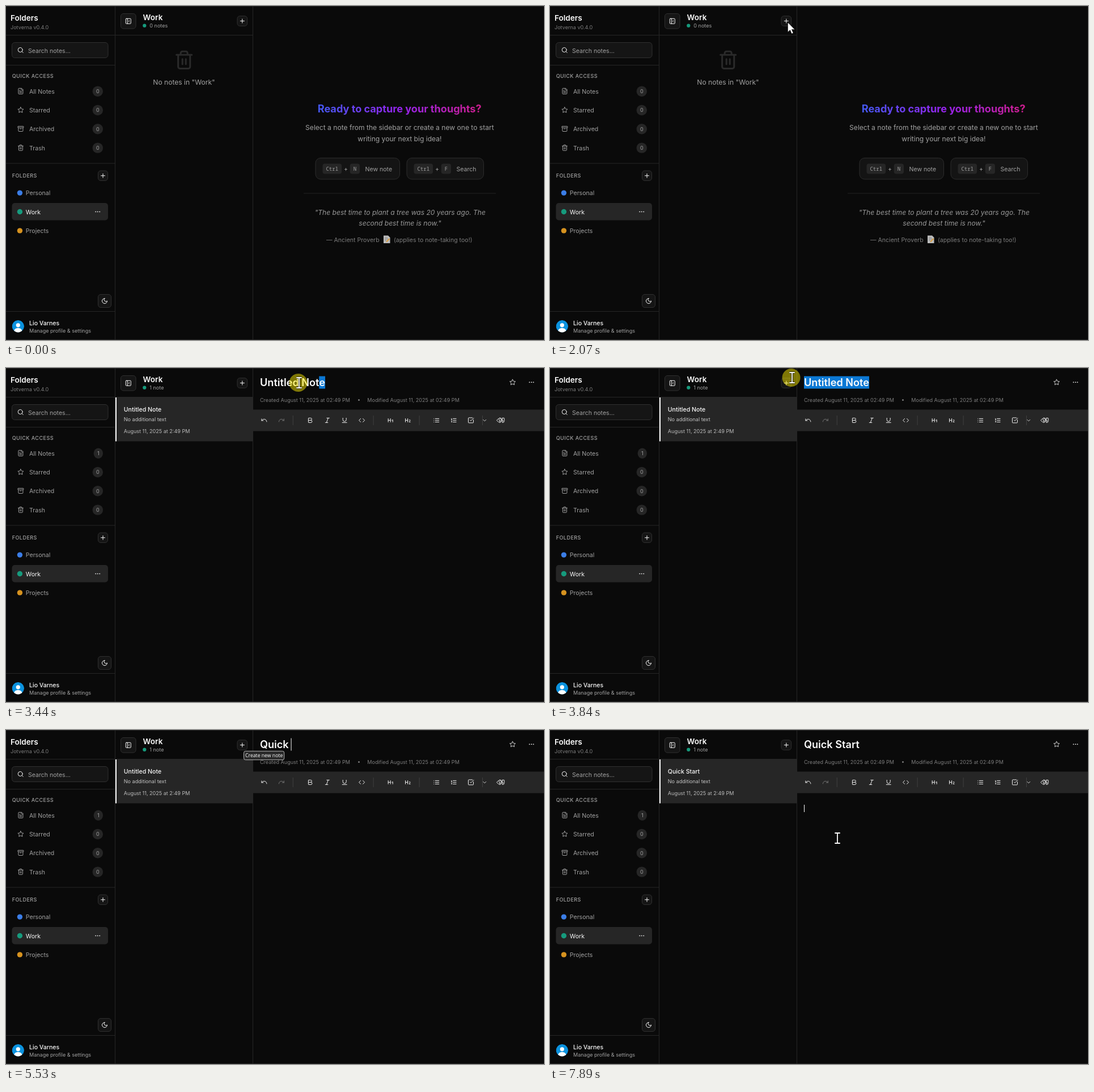
Animation of 949x590 px, one loop 8 s. Source, as an HTML page:

```html
<!DOCTYPE html>
<html lang="en">
<head>
<meta charset="utf-8">
<title>Notes app</title>
<style>
  html, body { margin: 0; width: 100%; height: 100%; overflow: hidden; background: #0a0a0a; }
  svg { display: block; width: 949px; height: 590px; }
  text { font-family: Inter, sans-serif; white-space: pre; }
  .mono { font-family: "Noto Sans Mono", "DejaVu Sans Mono", monospace; }
  .tip { font-family: "Open Sans", "Noto Sans", sans-serif; }
  .icon { fill: none; stroke-width: 2; stroke-linecap: round; stroke-linejoin: round; }
</style>
</head>
<body>
<svg id="stage" viewBox="0 0 949 590"></svg>
<script>
const LOOP = 8000, STEP = 68;
const XS = 9.06, SM = 10.57, BASE = 12.08, LG = 13.59, XL2 = 18.12;
const WHITE = '#fafafa', MUTED = '#a1a1a1', DIM = '#7c7c7c', LINE = '#262626', PANEL = '#262626';
const GREEN = '#169b7d';

const ICONS = {
  search: 'M19 11a8 8 0 1 1-16 0 8 8 0 0 1 16 0zM21 21l-4.3-4.3',
  file: 'M15 2H6a2 2 0 0 0-2 2v16a2 2 0 0 0 2 2h12a2 2 0 0 0 2-2V7zM14 2v4a2 2 0 0 0 2 2h4M10 9H8M16 13H8M16 17H8',
  star: 'M12 2l3.1 6.3 6.9 1-5 4.9 1.2 6.8-6.2-3.2L5.8 21 7 14.2 2 9.3l6.9-1z',
  archive: 'M3 3h18a1 1 0 0 1 1 1v3a1 1 0 0 1-1 1H3a1 1 0 0 1-1-1V4a1 1 0 0 1 1-1zM4 8v11a2 2 0 0 0 2 2h12a2 2 0 0 0 2-2V8M10 12h4',
  trash: 'M3 6h18M19 6v14a2 2 0 0 1-2 2H7a2 2 0 0 1-2-2V6M8 6V4a2 2 0 0 1 2-2h4a2 2 0 0 1 2 2v2M10 11v6M14 11v6',
  plus: 'M5 12h14M12 5v14',
  dots: 'M4 12a1 1 0 1 0 2 0 1 1 0 1 0-2 0m7 0a1 1 0 1 0 2 0 1 1 0 1 0-2 0m7 0a1 1 0 1 0 2 0 1 1 0 1 0-2 0',
  moon: 'M12 3a6 6 0 0 0 9 9 9 9 0 1 1-9-9z',
  panel: 'M5 3h14a2 2 0 0 1 2 2v14a2 2 0 0 1-2 2H5a2 2 0 0 1-2-2V5a2 2 0 0 1 2-2zM9 3v18M16 15l-3-3 3-3',
  undo: 'M3 7v6h6M21 17a9 9 0 0 0-9-9 9 9 0 0 0-6 2.3L3 13',
  redo: 'M21 7v6h-6M3 17a9 9 0 0 1 9-9 9 9 0 0 1 6 2.3l3 2.7',
  bold: 'M6 12h9a4 4 0 0 1 0 8H7a1 1 0 0 1-1-1V5a1 1 0 0 1 1-1h7a4 4 0 0 1 0 8',
  italic: 'M19 4h-9M14 20H5M15 4L9 20',
  underline: 'M6 4v6a6 6 0 0 0 12 0V4M4 20h16',
  code: 'M16 18l6-6-6-6M8 6l-6 6 6 6',
  h1: 'M4 12h8M4 18V6M12 18V6M17 12l3-2v8',
  h2: 'M4 12h8M4 18V6M12 18V6M21 18h-4c0-4 4-3 4-6 0-1.5-2-2.5-4-1',
  list: 'M3 12h.01M3 18h.01M3 6h.01M8 12h13M8 18h13M8 6h13',
  ordered: 'M10 12h11M10 18h11M10 6h11M4 10h2M4 6h1v4M6 18H4c0-1 2-2 2-3s-1-1.5-2-1',
  check: 'M21 10.5V19a2 2 0 0 1-2 2H5a2 2 0 0 1-2-2V5a2 2 0 0 1 2-2h12.5M9 11l3 3L22 4',
  chevron: 'M6 9l6 6 6-6',
  quote: 'M4 4h5q1 0 1 1v9q0 6-6 6-1 0-1-1v-2q3 0 3-4H4q-1 0-1-1V5q0-1 1-1zM15 4h5q1 0 1 1v9q0 6-6 6-1 0-1-1v-2q3 0 3-4h-2q-1 0-1-1V5q0-1 1-1z'
};

// Markup helpers
const icon = (name, cx, cy, color = WHITE, size = 12) =>
  `<path class="icon" d="${ICONS[name]}" stroke="${color}" transform="translate(${cx - size / 2} ${cy - size / 2}) scale(${size / 24})"/>`;
const text = (x, y, str, size, fill = MUTED, more = '') =>
  `<text x="${x}" y="${y}" font-size="${size}" fill="${fill}" ${more}>${str}</text>`;
const box = (x, y, w, h, r, fill, stroke = 'none', more = '') =>
  `<rect x="${x}" y="${y}" width="${w}" height="${h}" rx="${r}" fill="${fill}" stroke="${stroke}" ${more}/>`;
const dot = (x, y, r, fill) => `<circle cx="${x}" cy="${y}" r="${r}" fill="${fill}"/>`;
const button = (x, y, w, h, name) =>
  box(x, y, w, h, 4.5, '#151515', '#303030') + icon(name, x + w / 2, y + h / 2);
const badge = (x, y, str, more = '') =>
  `<g ${more}>` + box(x, y - 9.2, 171 - x, 18.4, 9, PANEL) +
  text((x + 171) / 2, y + 3.3, str, XS, MUTED, MID) + '</g>';
const MID = 'text-anchor="middle"';

const quickLinks = [['file', 'All Notes'], ['star', 'Starred'], ['archive', 'Archived'], ['trash', 'Trash']];

const sidebar =
  text(8, 25.7, 'Folders', LG, WHITE, 'font-weight="600"') +
  text(8, 41.2, 'Jotverna v0.4.0', XS, DIM) +
  box(10.5, 64.5, 169.5, 27, 5, '#151515', '#303030') +
  icon('search', 25.7, 78) + text(39, 82.6, 'Search notes...', SM) +
  text(10.7, 126.8, 'QUICK ACCESS', XS, MUTED, 'font-weight="500" letter-spacing=".45"') +
  quickLinks.map(([name, label], i) => {
    const y = 150.7 + i * 33.3;
    return icon(name, 25.9, y - .3, MUTED) + text(41, y + 4, label, SM) +
      (i ? badge(152.6, y, '0') : badge(152.6, y, '0', 'id="count0"') + badge(154.6, y, '1', 'id="count1"'));
  }).join('') +
  text(10.7, 303.3, 'FOLDERS', XS, MUTED, 'font-weight="500" letter-spacing=".45"') +
  button(162.5, 291, 17, 17.5, 'plus') +
  box(10.5, 348, 169.5, 30.4, 5, PANEL) + icon('dots', 161.7, 363.4) +
  [['Personal', '#3b7de6'], ['Work', GREEN], ['Projects', '#d6921f']].map(([label, color], i) => {
    const y = 330.2 + i * 33.4;
    return dot(24.4, y - .1, 4.7, color) + text(34.8, y + 4.1, label, SM, i === 1 ? WHITE : MUTED);
  }).join('') +
  button(162.5, 509.5, 23, 23, 'moon') +
  `<clipPath id="round"><circle cx="21.3" cy="565.8" r="10.7"/></clipPath><g clip-path="url(#round)">` +
  dot(21.3, 565.8, 10.7, '#0b92de') + dot(21.3, 563.8, 3.6, '#fff') +
  '<ellipse cx="21.3" cy="574" rx="7" ry="5.2" fill="#fff"/></g>' +
  text(41, 564.4, 'Lio Varnes', SM, WHITE, 'font-weight="500"') +
  text(41, 577.3, 'Manage profile &amp; settings', XS);

const column =
  button(202.5, 13.5, 26.5, 26.5, 'panel') +
  text(241.6, 25, 'Work', LG, WHITE, 'font-weight="600"') +
  dot(244.3, 34.7, 3.1, GREEN) +
  text(253.3, 38.1, '0 notes', XS, MUTED, 'id="total"') +
  button(408, 17.7, 17.6, 17.6, 'plus');

const key = (x, w, str) =>
  box(x, 278.4, w, 18, 4, PANEL) + text(x + w / 2, 290.6, str, XS, MUTED, MID + ' class="mono"');
const shortcut = (x, w, letter, label) =>
  box(x, 268.5, w, 37.5, 9, '#141414', '#2c2c2c') + key(x + 12.5, 33.6, 'Ctrl') +
  text(x + 53.4, 292, '+', SM, MUTED, MID) + key(x + 60.7, 17.3, letter) + text(x + 87.5, 292, label, SM);

const emptyState =
  icon('trash', 314.2, 95.3, '#2a2a2a', 36.2) +
  text(314, 138.6, 'No notes in "Work"', BASE, MUTED, MID) +
  text(694.2, 187.8, 'Ready to capture your thoughts?', XL2, 'url(#hue)', MID + ' font-weight="700"') +
  text(694.4, 219.2, 'Select a note from the sidebar or create a new one to start', BASE, MUTED, MID) +
  text(694.4, 238.8, 'writing your next big idea!', BASE, MUTED, MID) +
  shortcut(546, 148.5, 'N', 'New note') + shortcut(707, 135.5, 'F', 'Search') +
  box(525, 330.5, 339, 1, 0, '#222') +
  text(695.3, 369.3, '"The best time to plant a tree was 20 years ago. The', BASE, '#979797', MID + ' font-style="italic"') +
  text(695, 387.5, 'second best time is now."', BASE, '#979797', MID + ' font-style="italic"') +
  text(565, 417, '— Ancient Proverb', SM, DIM) +
  '<path d="M666 405.5h8l3.5 3.5v10h-11.5z" fill="#bdbdbd"/>' +
  '<path d="M668 409h5M668 411.5h6M668 414h3" stroke="#777" stroke-width=".8"/>' +
  '<path d="M671 416.5l5.5-5.5" stroke="#d89a3c" stroke-width="2"/>' +
  text(684, 417, '(applies to note-taking too!)', SM, DIM);

const tools = ['undo', 'redo', '', 'bold', 'italic', 'underline', 'code', '', 'h1', 'h2', '', 'list', 'ordered', 'check', '', 'code'];
let toolX = 455.4;
const toolbar = box(436, 73.5, 513, 38, 0, PANEL) + tools.map(name => {
  const x = toolX;
  toolX += name ? 30.4 : 20.2;
  if (!name) return box(x - 10.4, 84, 1, 17, 0, '#404040');
  return icon(name, x, 92.4, name === 'redo' ? '#757575' : '#f0f0f0');
}).map((part, i) => part).join('') + icon('chevron', 844.3, 92.6, '#f0f0f0', 10) + icon('quote', 874.4, 92.4, '#f0f0f0');

const noteState =
  box(193, 52, 242, 77.5, 0, PANEL) + box(193, 52, 2, 77.5, 0, WHITE) +
  text(207.8, 76.8, 'Untitled Note', SM, WHITE, 'id="listTitle" font-weight="500"') +
  text(207.8, 94, 'No additional text', XS, '#c4c4c4') +
  text(207.8, 115.3, 'August 11, 2025 at 2:49 PM', XS, '#bababa') +
  text(448, 59.5, 'Created August 11, 2025 at 02:49 PM', XS, DIM) +
  dot(622.5, 56.4, 1.5, DIM) +
  text(637.3, 59.5, 'Modified August 11, 2025 at 02:49 PM', XS, DIM) +
  icon('star', 893.6, 25.2, '#d0d0d0') + icon('dots', 927, 25.2) + toolbar +
  '<rect id="selection" y="14.5" height="22" fill="#0b78d4"/>' +
  text(448, 32, '', XL2, WHITE, 'id="title" font-weight="600"');

const lines =
  [[0, 0, 949, 1], [0, 589, 949, 1], [192, 0, 1, 590], [435, 0, 1, 590],
   [0, 51, 435, 1], [0, 104, 192, 1], [0, 277.5, 192, 1], [0, 539, 192, 1]]
    .map(([x, y, w, h]) => box(x, y, w, h, 0, LINE)).join('');

const overlay =
  box(0, 14.5, 1, 22, 0, WHITE, 'none', 'id="caret"') +
  box(448, 132, 1, 13, 0, WHITE, 'none', 'id="bodyCaret"') +
  '<g id="tooltip">' + box(419.5, 37.3, 71.2, 15.4, 3, '#2b2b2b', '#b4b4b4') +
  text(455.2, 48.3, 'Create new note', 8.7, '#fff', MID + ' class="tip"') + '</g>' +
  '<circle id="press" r="16" fill="#fe0" opacity=".48"/>' +
  '<path id="arrow" d="M0 0V17L4 13.4 6.8 20 9.6 18.8 6.9 12.4H12.2Z" fill="#fff" stroke="#111" stroke-width=".6"/>' +
  '<g id="beam" fill="none"><path d="M-4.7-9h9.4M-4.7 9h9.4M0-9V9" stroke="#000" stroke-width="3"/>' +
  '<path d="M-4.7-9h9.4M-4.7 9h9.4M0-9V9" stroke="#fff" stroke-width="1.8"/></g>';

document.getElementById('stage').innerHTML =
  `<defs><linearGradient id="hue" gradientUnits="userSpaceOnUse" x1="524" x2="864" y1="0" y2="0">
     <stop stop-color="#3562f2"/><stop offset=".5" stop-color="#9524ee"/><stop offset="1" stop-color="#d61c7c"/>
   </linearGradient></defs>` +
  box(0, 0, 949, 590, 0, '#0a0a0a') + lines + sidebar + column +
  `<g id="empty">${emptyState}</g><g id="note">${noteState}</g>` + overlay;

// Timeline: each move is a start time and [step, x, y] keys
const MOVES = [
  [990, [[0, 895, 504], [2, 672, 277], [4, 512, 115], [6, 449, 50], [8, 416, 28], [9, 413, 26], [11, 419.5, 29]]],
  [2680, [[0, 428, 30], [2, 478, 30], [5, 548, 26], [7, 567.5, 25], [9, 567.5, 25], [10, 553, 25], [11, 517, 26]]],
  [3500, [[0, 490, 26], [2, 455, 22], [5, 427, 17], [7, 425.5, 17], [9, 419.5, 20]]],
  [7200, [[0, 432, 40], [2, 470, 112], [4, 499, 186], [5, 505, 203], [6, 507, 191]]]
];
const PRESSES = [[1940, 2070], [3220, 4060], [7820, 7890]];
const TYPED = 'Quick Start';
const KEY_TIMES = [4800, 5070, 5190, 5300, 5420, 5530, 5860, 6130, 6330, 6600, 6800];

const el = Object.fromEntries([...document.querySelectorAll('#stage [id]')].map(e => [e.id, e]));
const show = (e, on) => e.setAttribute('visibility', on ? 'visible' : 'hidden');
const within = (t, a, b) => t >= a && t < b;
const setText = (e, str) => { if (e.textContent !== str) e.textContent = str; };

function pointer(t) {
  const [start, keys] = MOVES.filter(m => t >= m[0]).pop() || MOVES[0];
  const last = keys[keys.length - 1];
  const step = Math.max(0, Math.min(Math.floor((t - start) / STEP), last[0]));
  const i = Math.max(1, keys.findIndex(k => k[0] >= step));
  const [s0, x0, y0] = keys[i - 1], [s1, x1, y1] = keys[i];
  const f = (step - s0) / (s1 - s0);
  return [x0 + (x1 - x0) * f, y0 + (y1 - y0) * f];
}

function drawSelection(t) {
  let from = -1;
  const end = 448 + el.title.getComputedTextLength();
  if (within(t, 3440, 4800)) {
    const dragX = pointer(t - STEP)[0];  // the highlight trails the pointer by one step
    for (let i = 0; i < el.title.getNumberOfChars() && from < 0; i++) {
      const a = el.title.getStartPositionOfChar(i).x, b = el.title.getEndPositionOfChar(i).x;
      if ((a + b) / 2 > dragX) from = a;
    }
  }
  show(el.selection, from >= 0);
  if (from >= 0) {
    el.selection.setAttribute('x', from);
    el.selection.setAttribute('width', end - from);
  }
}

function drawPointer(t) {
  const [x, y] = pointer(t);
  const visible = within(t, 990, 4800) || t >= 7200;
  const overText = t > 2600 && x > 447 && (y < 42 || y > 112);
  const beam = overText || within(t, ...PRESSES[1]);
  show(el.arrow, visible && !beam);
  show(el.beam, visible && beam);
  show(el.press, PRESSES.some(p => within(t, ...p)));
  el.arrow.setAttribute('transform', `translate(${x} ${y})`);
  el.beam.setAttribute('transform', `translate(${x} ${y})`);
  el.press.setAttribute('cx', x - (beam ? 1.5 : 0));
  el.press.setAttribute('cy', y - (t > 7000 ? 1 : 0));
}

function draw(t) {
  const created = t >= 2470;
  show(el.empty, !created);
  show(el.note, created);
  show(el.count0, !created);
  show(el.count1, created);
  setText(el.total, created ? '1 note' : '0 notes');

  const typed = KEY_TIMES.filter(k => t >= k).length;
  setText(el.title, typed ? TYPED.slice(0, typed) : 'Untitled Note');
  setText(el.listTitle, t < 7400 ? 'Untitled Note' : TYPED);
  show(el.caret, within(t, 4800, 7335));
  el.caret.setAttribute('x', 447.3 + el.title.getComputedTextLength());
  show(el.bodyCaret, t >= 7890);
  show(el.tooltip, within(t, 4670, 7200));

  drawSelection(t);
  drawPointer(t);
}

const began = performance.now();
function frame() {
  draw((performance.now() - began) % LOOP);
  requestAnimationFrame(frame);
}
frame();
</script>
</body>
</html>
```
